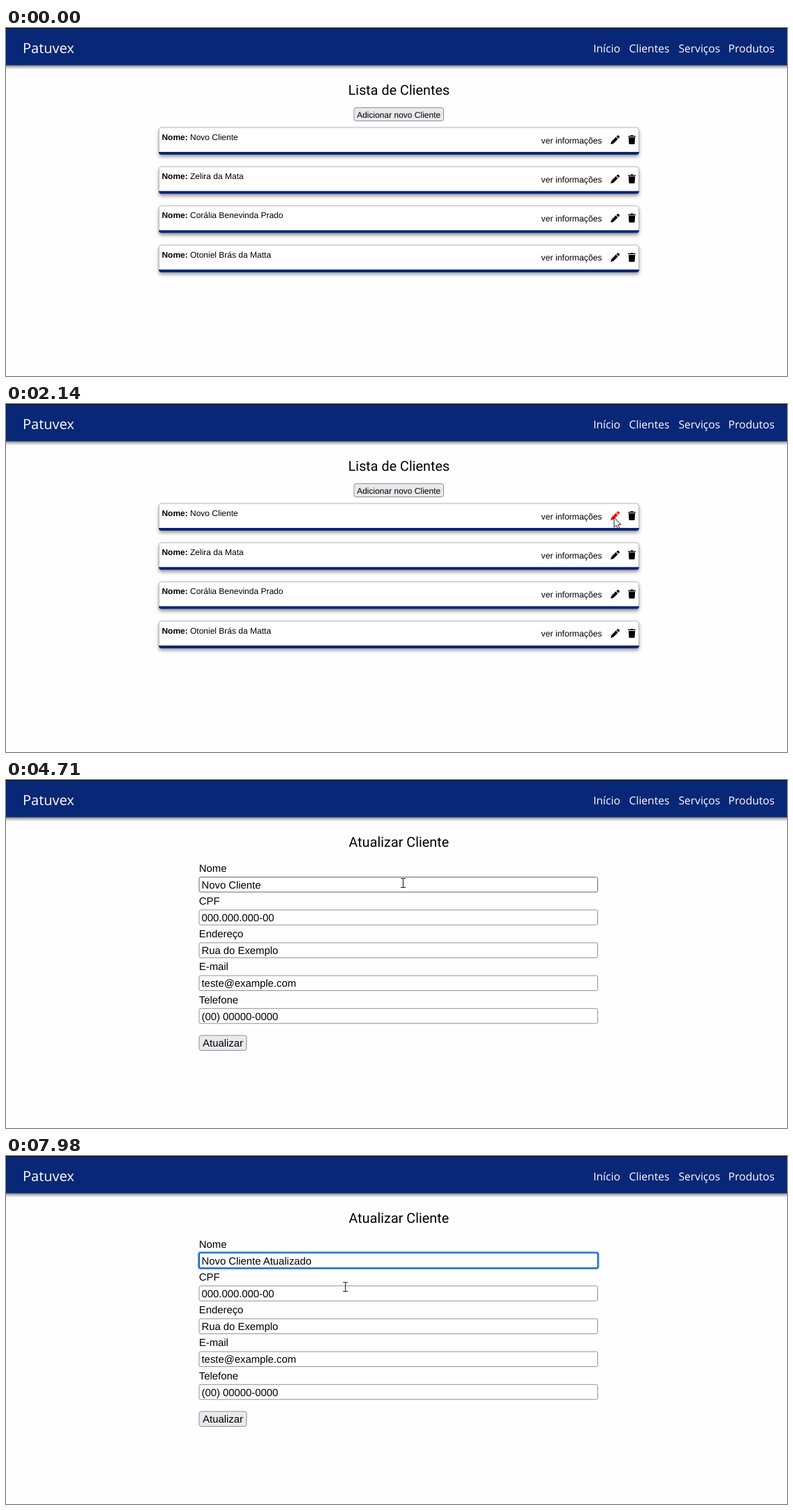
An HTML page that plays this animation: 1120 by 500 pixels, repeating every 8 s.

```html
<!DOCTYPE html>
<html lang="pt-BR">
<head>
<meta charset="utf-8">
<title>Clientes</title>
<style>
html, body { margin: 0; width: 100%; height: 100%; overflow: hidden; background: #fefefe; }
svg { display: block; width: 100vw; height: 100vh; }
text { white-space: pre; text-rendering: geometricPrecision; }
.nav { font-family: "Open Sans", "Noto Sans", sans-serif; fill: #fff; }
.title { font: 19.8px Roboto, sans-serif; text-anchor: middle; }
.small { font: 12px "Liberation Sans", Arial, sans-serif; }
.form { font: 14.85px "Liberation Sans", Arial, sans-serif; }
.bar { filter: drop-shadow(0 2px 2.5px rgba(0, 0, 0, .6)); }
.card { filter: drop-shadow(0 3px 2.5px rgba(0, 0, 0, .4)); }
.box { fill: #fff; stroke: #8f8f9d; }
.btn { fill: #e9e9ed; stroke: #8f8f9d; }
</style>
</head>
<body>
<svg id="stage" viewBox="0 0 1120 500" preserveAspectRatio="none">
  <rect width="1120" height="500" fill="#fefefe"/>
  <rect class="bar" x="-10" y="0" width="1140" height="53.5" fill="#082777"/>
  <rect width="1120" height="1" fill="#0b0d16"/>
  <g class="nav" id="nav"></g>
  <g id="list"></g>
  <g id="form"></g>
  <path id="arrow" d="M0 0V14.2L3.2 11.2 5.4 16.2 7.7 15.2 5.6 10.3H10Z" fill="#fff" stroke="#111" stroke-width=".95"/>
  <path id="beam" d="M-3.5-6.5H-1Q0-6.5 0-5.5Q0-6.5 1-6.5H3.5M0-5.5V5.5M-3.5 6.5H-1Q0 6.5 0 5.5Q0 6.5 1 6.5H3.5" fill="none" stroke="#222" stroke-width="1.1"/>
</svg>
<script>
const LOOP = 8000, PAGE_AT = 3290, HOVER_AT = 1930, FOCUS_AT = 4980;
const $ = id => document.getElementById(id);

function add(parent, tag, attrs, content) {
  const el = document.createElementNS("http://www.w3.org/2000/svg", tag);
  for (const k in attrs) el.setAttribute(k, attrs[k]);
  if (content) el.textContent = content;
  return parent.appendChild(el);
}
const text = (parent, x, y, content, attrs) => add(parent, "text", { x, y, ...attrs }, content);
const rect = (parent, x, y, width, height, attrs) => add(parent, "rect", { x, y, width, height, ...attrs });
const show = (el, on) => el.setAttribute("visibility", on ? "visible" : "hidden");

// Navigation bar
text($("nav"), 24, 36, "Patuvex", { "font-size": 20 });
[["Início", 842.2], ["Clientes", 893.6], ["Serviços", 964.4], ["Produtos", 1035.8]]
  .forEach(([label, x]) => text($("nav"), x, 35, label, { "font-size": 15.6 }));

// Client list
const PENCIL = "M8.2 2 9.6.6Q10.4-.1 11.2.6L12.4 1.8Q13.1 2.6 12.4 3.4L11 4.8ZM7.4 2.7 10.3 5.6 4 11.9.4 13Q0 13 0 12.6L1.1 9Z";
const TRASH = "M0 .9H3.3L4 0H7L7.7.9H11V2.2H0ZM.8 3H10.2L9.6 12Q9.5 13 8.6 13H2.4Q1.5 13 1.4 12Z";
const list = $("list");
text(list, 563.4, 95.5, "Lista de Clientes", { class: "title" });
rect(list, 499, 114.5, 128.5, 19, { class: "btn", rx: 3 });
text(list, 563.2, 129.3, "Adicionar novo Cliente", { class: "small", "text-anchor": "middle" });
const pencils = ["Novo Cliente", "Zelira da Mata", "Corália Benevinda Prado", "Otoniel Brás da Matta"].map((name, i) => {
  const g = add(list, "g", { transform: `translate(0 ${i * 56.3})`, class: "small" });
  const card = add(g, "g", { class: "card" });
  rect(card, 219.5, 143, 688, 38.5, { rx: 3.5, fill: "#fff", stroke: "#b9b9be" });
  add(card, "path", { d: "M219 178H908Q908 182 904 182H223Q219 182 219 178Z", fill: "#082777" });
  text(g, 223.4, 160.8, "Nome:", { "font-weight": "bold" });
  text(g, 264, 160.8, name);
  text(g, 767.6, 165.5, "ver informações", { style: "font-size:12.25px" });
  add(g, "path", { d: TRASH, transform: "translate(892 154)" });
  return add(g, "path", { d: PENCIL, transform: "translate(867.2 154)" });
});

// Update form
const form = $("form");
add(form, "g", { class: "form" });
text(form, 563.4, 95.5, "Atualizar Cliente", { class: "title" });
const fields = [
  ["Nome", "Novo Cliente"],
  ["CPF", "000.000.000-00"],
  ["Endereço", "Rua do Exemplo"],
  ["E-mail", "teste@example.com"],
  ["Telefone", "(00) 00000-0000"]
].map(([label, value], i) => {
  const g = add(form, "g", { transform: `translate(0 ${i * 47.2})`, class: "form" });
  text(g, 276.8, 131.8, label);
  const box = rect(g, 277, 139.5, 571.5, 21.5, { class: "box", rx: 2 });
  return { g, box, value: text(g, 280.5, 155.8, value) };
});
const nameField = fields[0];
const ring = add(nameField.g, "g", { fill: "none" });
rect(ring, 275.2, 137.4, 575.3, 25.4, { rx: 3.5, stroke: "#a9c8f3", "stroke-width": 1.6 });
rect(ring, 276.9, 139.1, 571.9, 22, { rx: 2, stroke: "#0a5ad2", "stroke-width": 1.9 });
const caret = rect(nameField.g, 0, 142.5, 1, 16, { fill: "#111" });
rect(form, 277, 367, 68, 21.5, { class: "btn", rx: 3 });
text(form, 311, 383.3, "Atualizar", { class: "form", "text-anchor": "middle" });

// Pointer moves: start, end, steps, then a quadratic curve
const moves = [
  [470, 1240, 12, [1030, 476], [940, 325], [866, 184]],
  [1310, 2070, 12, [866, 184], [860, 171.5], [871, 165]],
  [2140, 2140, 1, [871, 165], [872, 164], [872, 163]],
  [4280, 4710, 7, [872, 163], [780, 190], [569.5, 148]],
  [7640, 7980, 5, [569.5, 148], [540, 160], [486.8, 188]]
];
function pointerAt(t) {
  const move = moves.filter(m => t >= m[0]).pop();
  if (!move) return null;
  const [start, end, steps, a, b, c] = move;
  const done = end > start ? Math.min(1, (t - start) / (end - start)) : 1;
  const u = (Math.floor(done * (steps - 1) + .01) + 1) / steps;
  const s = 1 - (1 - u) ** 2;
  return [0, 1].map(i => (1 - s) ** 2 * a[i] + 2 * s * (1 - s) * b[i] + s * s * c[i]);
}

// Typing: one time per key
const BASE = "Novo Cliente", TYPED = " Atualizado";
const keys = [5580, 6150, 6220, 6360, 6490, 6570, 6700, 6840, 7040, 7110, 7240];
function drawField(t) {
  const focused = t >= FOCUS_AT;
  const count = keys.filter(k => t >= k).length;
  nameField.value.textContent = BASE + TYPED.slice(0, count);
  nameField.box.style.stroke = t >= 4640 ? "#676774" : "";
  show(ring, focused);
  const since = t - (count ? keys[count - 1] : FOCUS_AT);
  const lit = focused && since % 1000 < (count ? 460 : 530);
  caret.setAttribute("x", 280.5 + nameField.value.getComputedTextLength());
  show(caret, lit);
}

function draw(t) {
  const onForm = t >= PAGE_AT;
  list.style.display = onForm ? "none" : "";
  form.style.display = onForm ? "" : "none";
  pencils[0].setAttribute("fill", t >= HOVER_AT ? "#f00" : "#000");
  if (onForm) drawField(t);
  else [ring, caret].forEach(el => show(el, false));

  const p = pointerAt(t);
  const beam = p && onForm && p[0] < 849 && (t >= 7640 || p[1] < 161);
  show($("arrow"), p && !beam);
  show($("beam"), beam);
  if (p) $(beam ? "beam" : "arrow").setAttribute("transform", `translate(${p[0].toFixed(1)} ${p[1].toFixed(1)})`);
}

const began = performance.now();
function tick() {
  draw((performance.now() - began) % LOOP);
  requestAnimationFrame(tick);
}
tick();
</script>
</body>
</html>
```
